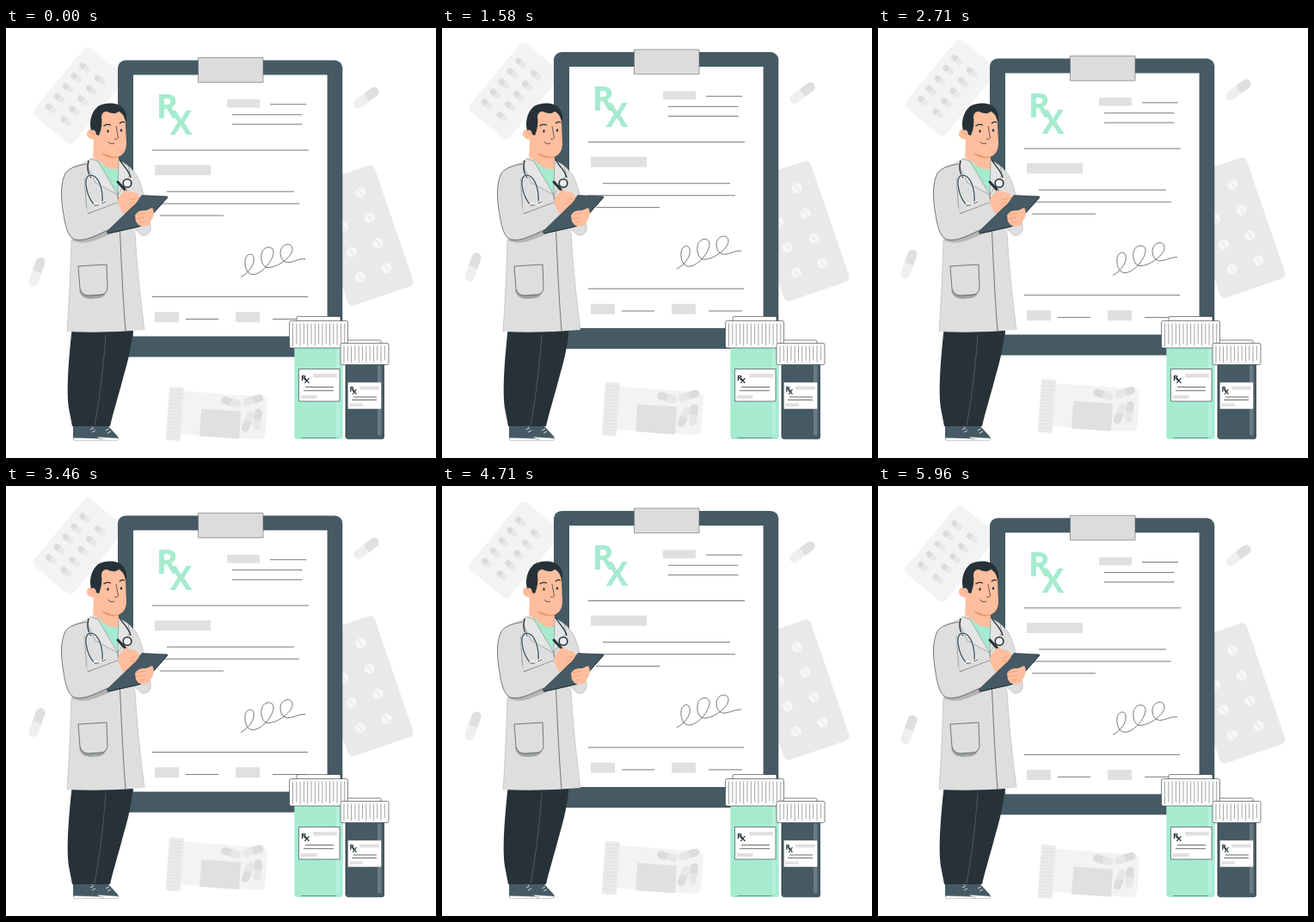
An HTML page with a canvas that plays this animation: 500x500 px, repeating every 6 s.

```html
<!DOCTYPE html>
<html lang="en">
<head>
<meta charset="utf-8">
<title>Prescription</title>
<style>
html, body { margin: 0; width: 100%; height: 100%; overflow: hidden; background: #fff; }
canvas { display: block; width: 100vw; height: 100vh; }
</style>
</head>
<body>
<canvas id="stage" width="500" height="500"></canvas>
<script>
const c = document.getElementById('stage').getContext('2d');
const SLATE = '#455a64', INK = '#263238', MINT = '#a6ebd0', GRAY = '#e0e0e0';
const SKIN = '#ffbe9d', SHADE = '#eb996e', COAT = '#dedede';

function path(d, fill, stroke, width = 0.8) {
  const p = new Path2D(d);
  if (fill) { c.fillStyle = fill; c.fill(p); }
  if (stroke) { c.strokeStyle = stroke; c.lineWidth = width; c.stroke(p); }
}
function box(x, y, w, h, fill, r = 0, stroke, width = 0.8) {
  c.beginPath();
  c.roundRect(x, y, w, h, r);
  if (fill) { c.fillStyle = fill; c.fill(); }
  if (stroke) { c.strokeStyle = stroke; c.lineWidth = width; c.stroke(); }
}
function line(x1, y1, x2, y2, color = INK, width = 0.7) {
  c.beginPath();
  c.moveTo(x1, y1);
  c.lineTo(x2, y2);
  c.strokeStyle = color;
  c.lineWidth = width;
  c.stroke();
}
function dot(x, y, rx, ry, fill) {
  c.beginPath();
  c.ellipse(x, y, rx, ry, 0, 0, 7);
  c.fillStyle = fill;
  c.fill();
}
function at(x, y, deg, draw) {
  c.save();
  c.translate(x, y);
  c.rotate(deg * Math.PI / 180);
  draw();
  c.restore();
}
function capsule(x, y, deg, len, w, first, second) {
  at(x, y, deg, () => {
    box(-len / 2, -w / 2, len / 2, w, first, [w / 2, 0, 0, w / 2]);
    box(0, -w / 2, len / 2, w, second, [0, w / 2, w / 2, 0]);
  });
}
function rx(x, y, size, dx, dy, color) {
  c.fillStyle = color;
  c.font = `700 ${size}px "Open Sans", "Noto Sans", sans-serif`;
  c.fillText('R', x, y);
  c.fillText('X', x + dx, y + dy);
}
// Linear back-and-forth lift of 10 px
function lift(t, period) {
  return -10 * (1 - Math.abs(1 - 2 * (t % period) / period));
}

function backdrop() {
  at(94, 20, 39.5, () => {
    box(0, 0, 60, 102, '#f3f3f3', 6);
    for (let i = 0; i < 5; i++) {
      for (const x of [14.5, 37.3]) capsule(x, 21.5 + 15.5 * i, 0, 14, 7, '#dcdcdc', '#e8e8e8');
    }
  });
  at(427, 158, -18.9, () => {
    box(-80, 0, 80, 148.5, '#e9e9e9', 6);
    for (let i = 0; i < 4; i++) {
      for (const x of [-24.5, -57]) {
        const y = 27 + 30.9 * i;
        dot(x, y, 6, 6, '#f7f7f7');
        line(x - 1.8, y - 5, x + 1.8, y + 5, '#e4e4e4', 1);
      }
    }
  });
  capsule(419, 81, -37, 34, 11, '#efefef', '#dfdfdf');
  capsule(36, 283.5, -70, 35, 11, '#efefef', '#dfdfdf');
  at(190, 417, 4, () => {
    box(15, 4, 100, 50, '#f3f3f3', [2, 7, 7, 2]);
    box(0, 0, 17, 62, '#eaeaea', 2);
    for (let y = 4; y < 60; y += 4) line(2, y, 15, y, '#dfdfdf', 0.8);
    box(39, 23, 46, 32, GRAY);
    capsule(73, 13, 12, 24, 9, '#dcdcdc', '#e7e7e7');
    capsule(98, 9, -22, 25, 9, '#e7e7e7', '#dcdcdc');
    capsule(94, 34, 108, 25, 9, '#e7e7e7', '#dcdcdc');
    capsule(105, 31, 92, 25, 9, '#dcdcdc', '#e7e7e7');
  });
}

function board() {
  box(130, 37, 261.3, 345, SLATE, 9);
  box(148, 54, 225.6, 304, '#fff');
  box(223.5, 34, 75.5, 28.7, '#dcdcdc', 0, '#666', 0.6);
  rx(174.5, 105, 39, 16, 19, MINT);
  for (const [x, y, w, h] of [[257, 82.5, 38, 9.5], [173, 158.7, 65, 12], [173, 329.7, 28, 12], [267, 329.7, 28, 12]]) {
    box(x, y, w, h, GRAY);
  }
  for (const [a, b, y] of [
    [307, 349, 88.3], [263, 344.5, 100.3], [263, 344.5, 111.5], [170, 352, 141.6],
    [187, 335, 189.7], [170, 341, 203.7], [179, 253, 217.6],
    [170, 351, 312.1], [209, 247, 338], [310, 349, 338]
  ]) line(a, y, b, y, '#445057', 0.75);
  path('M273 289C281 285 290 275 288 266C287 261 279 261 278 270C277 280 282 287 288 286C299 285 312 268 311 259C310 252 298 253 297 263C296 272 300 279 306 278C318 277 334 264 333 256C332 248 320 250 319 260C319 268 323 273 330 272C336 271 340 268 348 268',
    null, INK, 0.65);
}

function legs() {
  path('M78 461L78 477Q78 479 82 479L112 479Q114 476 108 473L98 461Z', SLATE);
  path('M100 460L103 475L128 479Q132 478 130 475L119 463L116 459Z', SLATE);
  path('M78 476.5L113 477.5L112 479.5L79 479.5ZM106 475.5L130 477L130 479.5L112 479.5Z', '#fff', '#78878e', 0.4);
  path('M98 467L102 465M100 470L104 468M116 468L120 466M118 471L122 469', null, '#fff', 0.8);
  path('M76.5 351C73 385 70 420 73 442L77 463L121 463C124 450 129 433 134 415C139 396 146 375 147.5 350Z', INK);
  path('M116 357C114 385 110 425 103 462', null, '#65747b', 0.6);
}

function head() {
  path('M102 126L101 155Q116 174 131 166L131 148Z', SKIN);
  path('M111 146Q118 153 131 151L131 148Z', SHADE);
  path('M103 105C103 95 115 93 125 95C136 97 139 103 139 112L140 134C140 144 135 150 127 150C117 149 108 143 105 131Z', SKIN);
  path('M105 119C100 116 94 118 94 123C94 128 100 131 106 129Z', SKIN);
  // receding hairline
  path('M99 119C96 108 100 97 107 91C115 86 130 86 136 93C140 98 141 104 139.5 110C138 103 135 98 131 97C127 101 121 99 117 97C113 97 111 100 111 104C112 110 111 118 108 125L105 124Q104 117 99 119Z', INK);
  path('M113.5 114Q117 111 122 113M132 111Q135 108 138 110', null, INK, 1.3);
  dot(118.5, 120, 1.2, 1.7, INK);
  dot(134, 119, 1.2, 1.7, INK);
  path('M128 114L130.5 128Q129 130 126 129', null, INK, 0.7);
  path('M119 132Q121 136 126 134', null, INK, 0.8);
  path('M98 121Q102 120 103 125', null, SHADE, 0.7);
}

function coat() {
  // far sleeve
  path('M145 164C154 169 158 185 162 202L168 229C169 237 165 242 158 241L148 232Z', COAT, '#888', 0.4);
  path('M98 152C90 158 75 160 69 169C63 181 64 197 66 211L76 246C75 284 73 322 71 353Q116 355 161 351C156 312 152 274 150 238L151 190C151 176 149 165 143 161L132 154L129 190L104 151Z', COAT);
  path('M104 155L130 192L131 164Q118 166 108 154Z', MINT);
  path('M98 152L94 159L104 180L130 194L107 155Z', '#e5e5e5', '#6c7376', 0.5);
  path('M131 153L142 160L144 171L130 194Z', '#e5e5e5', '#6c7376', 0.5);
  path('M130 194C133 230 134 290 139 352', null, INK, 0.6);
  path('M91 170L94 216L116 209', null, '#555', 0.5);
  // near sleeve
  path('M76 246Q87 253 103 247L121 240L118 235L90 244Z', '#b4b4b4');
  path('M98 152C90 158 75 160 69 169C63 181 64 197 66 211C69 230 71 242 80 246C93 249 108 239 121 234L138 224L132 201L95 216L88 187Z', COAT);
  path('M94 158C82 160 73 163 69 169C63 181 64 197 66 211C69 230 71 242 80 246C93 249 108 239 121 234', null, INK, 0.6);
  path('M95 216L132 202', null, '#666', 0.6);
  path('M76 246C75 284 73 322 71 353M150 238C152 274 156 312 161 351', null, '#999', 0.4);
  // pocket
  path('M85 304Q87 315 99 315L109 314Q116 312 117 304Z', '#9da1a3');
  path('M84 277L117 275L118 303Q117 309 111 310L96 311Q88 311 86 303Z', COAT, INK, 0.6);
}

function stethoscope() {
  path('M96 154C94 162 94 168 99 174M132 153C137 162 143 165 145 174', null, INK, 1.4);
  path('M103 206C93 195 89 173 98 171C108 171 113 188 112 203', null, '#fff', 2.6);
  path('M103 206C93 195 89 173 98 171C108 171 113 188 112 203', null, SLATE, 1.5);
  path('M102 204L108 206M110 204L116 202', null, '#fff', 3);
  path('M103 206L108 206M111 204L116 202', null, INK, 0.9);
  c.beginPath();
  c.arc(141, 180.5, 4.8, 0, 7);
  c.fillStyle = '#eee';
  c.fill();
  c.strokeStyle = INK;
  c.lineWidth = 1.6;
  c.stroke();
}

function tablet() {
  path('M130 203C130 196 135 191 141 190L151 192Q156 195 154 200L151 211L136 216Z', SKIN);
  path('M158 194.5L187 195.8Q189 196 187 198L161 227Q158 230 154 231L119 239Q116 238 118 236L149 206Z', SLATE, INK, 0.6);
  path('M187.5 197L161 227Q158 230 154 231L119 239', null, INK, 1);
  path('M131 204C132 196 137 190 143 190L152 192Q157 196 154 200L150 205L141 211L133 211Z', SKIN);
  path('M144 200L152 198M143 204L150 203', null, SHADE, 0.7);
  c.lineCap = 'round';
  line(130, 179, 140, 190, INK, 3);
  c.lineCap = 'butt';
  path('M136 190Q141 186 145 191L142 196Z', SKIN);
  path('M150 218Q153 211 163 212L170 209Q173 213 171 220L166 229Q160 232 154 229L151 225Z', SKIN);
  path('M152 217L162 215M152 222L161 220M155 226L161 225', null, SHADE, 0.7);
}

function cap(x, y, w, h, topX, topW, topY) {
  box(topX, topY, topW, y - topY + 1, '#fff', 1.5, INK, 0.6);
  box(x, y, w, h, '#fff', 2, INK, 0.6);
  for (let i = 4; i < w - 1; i += 4.3) {
    line(x + i, y + 3, x + i, y + h - 2 - (i * 7 % 4), '#666', 0.6);
  }
}

function bottles() {
  box(335.3, 370, 56.4, 108, MINT, [0, 0, 3, 3]);
  box(384, 373, 4, 101, '#b8f0dc', 2);
  line(343, 476.5, 384, 476.5, '#466', 0.6);
  cap(329.5, 340.5, 68, 31.5, 338, 51, 335.5);
  box(340.5, 396.5, 47.5, 37.5, '#fff', 0, INK, 0.6);
  rx(343, 409.5, 9.5, 3.8, 3.7, INK);
  box(357, 402, 28, 4.5, GRAY);
  line(348, 417.5, 381, 417.5);
  line(346, 421.7, 381, 421.7);
  box(342.5, 427, 19, 4, GRAY);

  box(395, 390, 45, 88.3, SLATE, [0, 0, 3, 3]);
  box(432, 392, 4.5, 82, '#6a7b83', 2);
  line(395, 392, 395, 476, INK, 0.8);
  cap(389, 366.5, 56, 25, 397, 39, 363);
  box(397.5, 412, 39, 31, '#fff', 0, '#777', 0.5);
  rx(399.5, 422.5, 8, 3.2, 3, INK);
  box(411, 416.5, 23, 4, GRAY);
  line(404, 429, 431, 429);
  line(402, 432.5, 431, 432.5);
  box(399, 436.5, 16, 3.5, GRAY);
}

function floating(dy, draw) {
  c.save();
  c.translate(0, dy);
  draw();
  c.restore();
}

const start = performance.now();
function frame() {
  const t = (performance.now() - start) % 6000;
  c.fillStyle = '#fff';
  c.fillRect(0, 0, 500, 500);
  floating(lift(t, 6000), backdrop);
  floating(lift(t, 3000) + 0.5, board);
  legs();
  head();
  coat();
  stethoscope();
  tablet();
  bottles();
  requestAnimationFrame(frame);
}
frame();
</script>
</body>
</html>
```
